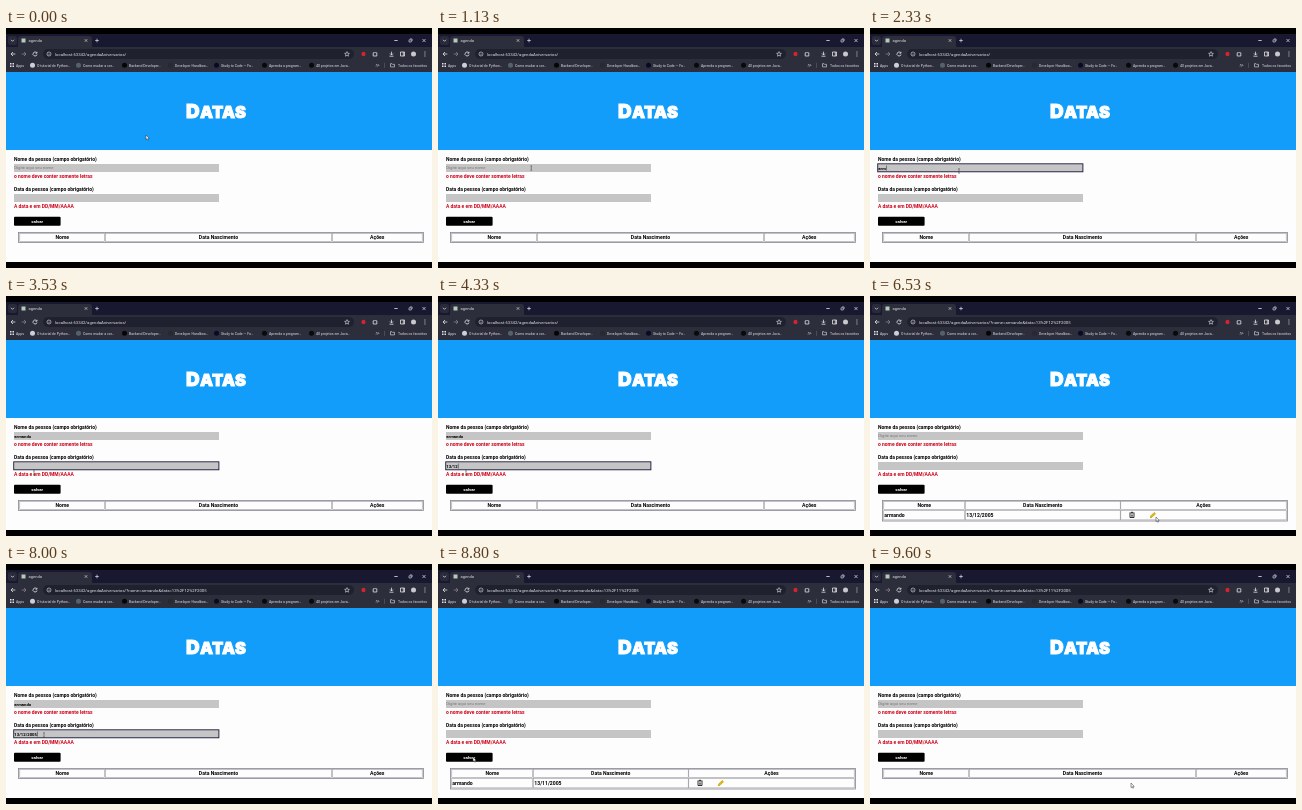
Animation, 426 px wide and 240 px high, one loop 9670 ms. Source, as an HTML page with a canvas:

```html
<!DOCTYPE html>
<html lang="pt-BR">
<head>
<meta charset="utf-8">
<title>agenda</title>
<style>
  html, body { margin: 0; width: 100%; height: 100%; overflow: hidden; background: #000; }
  canvas { display: block; width: 426px; height: 240px; }
</style>
</head>
<body>
<canvas id="stage" width="426" height="240"></canvas>
<script>
const ctx = document.getElementById('stage').getContext('2d');
const LOOP = 9670;
const PERSON = 'armando';
const FIRST_DATE = '13/12/2005', NEW_DATE = '13/11/2005';
const SAVE_1 = 5750, EDIT = 6950, SAVE_2 = 8750, REMOVE = 9450;

// Pointer stops: time, x, y
const POINTER = [
  [0, 140, 108], [350, 140, 108], [1300, 89, 143], [2700, 89, 143],
  [3400, 28, 177], [5150, 28, 177], [5600, 35, 194], [5850, 35, 194],
  [6450, 286, 222], [7000, 286, 222], [7700, 38, 171], [8500, 38, 171],
  [8700, 35, 194], [8850, 35, 194], [9300, 261, 220], [LOOP, 261, 220]
];

const clamp = v => Math.max(0, Math.min(1, v));
const between = (t, a, b) => t >= a && t < b;
const typed = (s, t, a, b) => s.slice(0, Math.floor(clamp((t - a) / (b - a)) * s.length));

function box(x, y, w, h, color, radius = 0) {
  ctx.fillStyle = color;
  ctx.beginPath();
  ctx.roundRect(x, y, w, h, radius);
  ctx.fill();
}

function frame(x, y, w, h, color, width = 0.7) {
  ctx.strokeStyle = color;
  ctx.lineWidth = width;
  ctx.strokeRect(x, y, w, h);
}

function text(s, x, y, size, color, weight = 400, align = 'left') {
  ctx.font = `${weight} ${size}px Roboto, sans-serif`;
  ctx.fillStyle = color;
  ctx.textAlign = align;
  ctx.fillText(s, x, y);
}

function path(d, x, y, color, width = 0.8, fill) {
  const shape = new Path2D(d);
  ctx.save();
  ctx.translate(x, y);
  if (fill) { ctx.fillStyle = fill; ctx.fill(shape); }
  ctx.strokeStyle = color;
  ctx.lineWidth = width;
  ctx.stroke(shape);
  ctx.restore();
}

function browser(url) {
  const light = '#e2e2e8', bar = '#2d2e3b';
  box(0, 6, 426, 13, '#181930');
  box(0, 19, 426, 25, bar);
  box(2, 8, 9, 9, '#292a3a', 2);
  path('M-1.5 -.7 L0 .8 L1.5 -.7', 6.5, 12.5, light);
  box(12, 8, 74, 12, bar, [3, 3, 0, 0]);
  box(15.5, 10.5, 4, 4, '#b4cabf');
  text('agenda', 22.5, 14, 4.1, light);
  path('M-1.3 -1.3 L1.3 1.3 M1.3 -1.3 L-1.3 1.3', 80, 12.5, light, 0.6);
  path('M-1.8 0 H1.8 M0 -1.8 V1.8', 91, 12.5, light, 0.7);
  path('M-1.7 0 H1.7', 390, 12.5, light);
  path('M-1.5 -.7 H.8 V1.5 H-1.5 Z M-.6 -1.6 H1.6 V.6', 404.5, 12.5, light, 0.6);
  path('M-1.5 -1.5 L1.5 1.5 M1.5 -1.5 L-1.5 1.5', 418, 12.5, light, 0.7);

  path('M2.3 0 H-2 M0 -2 L-2 0 L0 2', 7, 26, light);
  path('M-2.3 0 H2 M0 -2 L2 0 L0 2', 18, 26, '#85858c');
  path('M1.6 -1.3 A2 2 0 1 0 2 .5 M2 -2.2 V-.8 H.5', 29, 26, light);
  box(37, 21, 311, 10, '#20212e', 5);
  path('M-2 0 A2 2 0 1 0 2 0 A2 2 0 1 0 -2 0 M0 -.4 V1.1', 43, 26, light, 0.6);
  text(url, 49, 27.6, 4.26, light);
  path('M0 -2.4 L.7 -.7 L2.4 -.6 L1.1 .5 L1.5 2.2 L0 1.3 L-1.5 2.2 L-1.1 .5 L-2.4 -.6 L-.7 -.7 Z', 341, 26, light, 0.6);
  box(355.5, 23.8, 4, 4.4, '#d8232f', 2);
  path('M-1.8 -1.2 H-.6 A.8 .8 0 0 1 .8 -1.2 H1.8 V2 H-1.8 Z', 369, 26, light);
  path('M0 -2.3 V1 M-1.5 -.5 L0 1 L1.5 -.5 M-2 2.2 H2', 385.5, 26, light);
  path('M-2 -2 H2 V2 H-2 Z M.8 -2 V2', 396.5, 26, light);
  box(405, 23.5, 5, 5, '#c9c9cd', 2.5);
  for (const y of [24, 26, 28]) box(418.5, y - 0.4, 0.9, 0.9, light);

  for (let i = 0; i < 9; i++) box(4 + i % 3 * 1.5, 35 + Math.floor(i / 3) * 1.5, 1, 1, light);
  [
    ['Apps', 10], ['O tutorial de Python…', 31, '#c9d0d6'], ['Como mudar a cor…', 77, '#55626d'],
    ['Backend Developer…', 123, '#050508'], ['Developer Handboo…', 169, '#29292f'],
    ['Study to Code — Fo…', 215, '#0a0a23'], ['Aprenda a program…', 263, '#08080d'],
    ['40 projetos em Java…', 310, '#08080d'], ['Todos os favoritos', 392]
  ].forEach(([label, x, icon]) => {
    if (icon) box(x - 7, 34.7, 5, 5, icon, 2.5);
    text(label, x, 38.6, 3.5, light);
  });
  path('M-1.5 -1.2 L-.3 0 L-1.5 1.2 M.2 -1.2 L1.4 0 L.2 1.2', 371.5, 37.3, light, 0.6);
  path('M0 -2.5 V2.5', 378.5, 37.3, '#62626a', 0.6);
  path('M-2 -1.6 H-.5 L0 -1 H2 V1.6 H-2 Z', 386.5, 37.3, light, 0.6);
}

function banner() {
  box(0, 44, 426, 78, '#139dfb');
  ctx.save();
  ctx.fillStyle = ctx.strokeStyle = '#fff';
  ctx.lineWidth = 0.9;
  ctx.textAlign = 'left';
  ctx.letterSpacing = '0.3px';
  let x = 180;
  for (const [part, size] of [['D', 19], ['ATAS', 16.5]]) {
    ctx.font = `900 ${size}px Inter, sans-serif`;
    ctx.fillText(part, x, 90);
    ctx.strokeText(part, x, 90);
    x += ctx.measureText(part).width;
  }
  ctx.restore();
}

function field(y, label, value, hint, focused, placeholder = '') {
  text(label, 8, y - 3.2, 4.97, '#000', 700);
  box(8, y, 205, 8, '#c5c5c5');
  if (value) text(value, 8.3, y + 5.6, 4.25, '#000', 700);
  else text(placeholder, 8.3, y + 5.4, 4.2, '#75757a');
  if (focused) {
    frame(7.7, y - 0.2, 205.2, 8, '#18183a', 0.9);
    if (value) {
      const end = 8.6 + ctx.measureText(value).width;
      box(end, y + 1.5, 0.4, 5, '#000');
    }
  }
  text(hint, 8, y + 14, 4.97, '#cf0018', 700);
}

function table(date) {
  const edges = date ? [13.5, 95, 250.5, 416.5] : [13.5, 99, 326, 416.5];
  const border = '#85858f';
  frame(12.5, 204.5, 405, date ? 20.5 : 10, border, 0.8);
  ['Nome', 'Data Nascimento', 'Ações'].forEach((title, i) => {
    const x = edges[i], w = edges[i + 1] - x;
    frame(x + 0.3, 205.6, w - 0.6, 7.8, border, 0.5);
    if (date) frame(x + 0.3, 214.3, w - 0.6, 9.6, border, 0.5);
    text(title, x + w / 2, 211.2, 5.1, '#000', 700, 'center');
  });
  if (!date) return;
  text(PERSON, 14.3, 221, 5.1, '#000', 700);
  text(date, 96.3, 221, 5.1, '#000', 700);
  path('M-2.6 -2 H2.6 M-1 -2.7 H1 M-2 -1.5 V2.5 H2 V-1.5 M-.8 -.2 L.8 1.4 M.8 -.2 L-.8 1.4', 262, 219, '#000', 0.8);
  path('M-2.7 2.7 L-2.3 1 L1.2 -2.5 L2.5 -1.2 L-1 2.3 Z', 283, 219, '#b58e00', 0.6, '#e8bd00');
}

function pointer(t) {
  const i = POINTER.findIndex(p => p[0] > t);
  const [t0, x0, y0] = POINTER[i - 1], [t1, x1, y1] = POINTER[i];
  const k = (t - t0) / (t1 - t0), ease = k * k * (3 - 2 * k);
  const x = x0 + (x1 - x0) * ease, y = y0 + (y1 - y0) * ease;
  if (x < 213 && y > 128 && y < 182) path('M-.8 -2.2 H.8 M0 -2.2 V2.2 M-.8 2.2 H.8', x, y, '#333', 0.5);
  else path('M0 -1 V3.6 L1 2.7 L1.8 4.3 L2.5 4 L1.8 2.4 H3.2 Z', x, y, '#333', 0.5, '#fff');
}

function editedDate(t) {
  if (t < 8250) return FIRST_DATE.slice(0, 10 - Math.floor(clamp((t - 8040) / 200) * 6));
  return NEW_DATE.slice(0, 4) + typed(NEW_DATE.slice(4), t, 8250, 8550);
}

function draw(t) {
  const editing = between(t, EDIT, SAVE_2);
  let name = '', date = '', saved = '';
  if (t < SAVE_1) {
    name = typed(PERSON, t, 1900, 2890);
    date = typed(FIRST_DATE, t, 3600, 4950);
  } else if (editing) {
    name = PERSON;
    date = editedDate(t);
  }
  if (between(t, SAVE_1, EDIT)) saved = FIRST_DATE;
  if (between(t, SAVE_2, REMOVE)) saved = NEW_DATE;

  let url = 'localhost:63342/agendaAniversarios/';
  if (t >= SAVE_1) url += `?nome=${PERSON}&data=` + encodeURIComponent(t < SAVE_2 ? FIRST_DATE : NEW_DATE);

  box(0, 0, 426, 240, '#000');
  box(0, 122, 426, 112, '#fdfdfd');
  browser(url);
  banner();
  field(136, 'Nome da pessoa (campo obrigatório)', name, 'o nome deve conter somente letras',
    between(t, 1400, 3450), 'Digite aqui seu nome');
  field(166, 'Data da pessoa (campo obrigatório)', date, 'A data e em DD/MM/AAAA',
    between(t, 3450, 5600) || between(t, 7750, 8650));
  box(8, 188.8, 46.6, 9, '#000', 1);
  text('salvar', 31.2, 194.8, 4.4, '#fff', 700, 'center');
  table(saved);
  pointer(t);
}

function tick() {
  draw(performance.now() % LOOP);
  requestAnimationFrame(tick);
}
tick();
</script>
</body>
</html>
```
